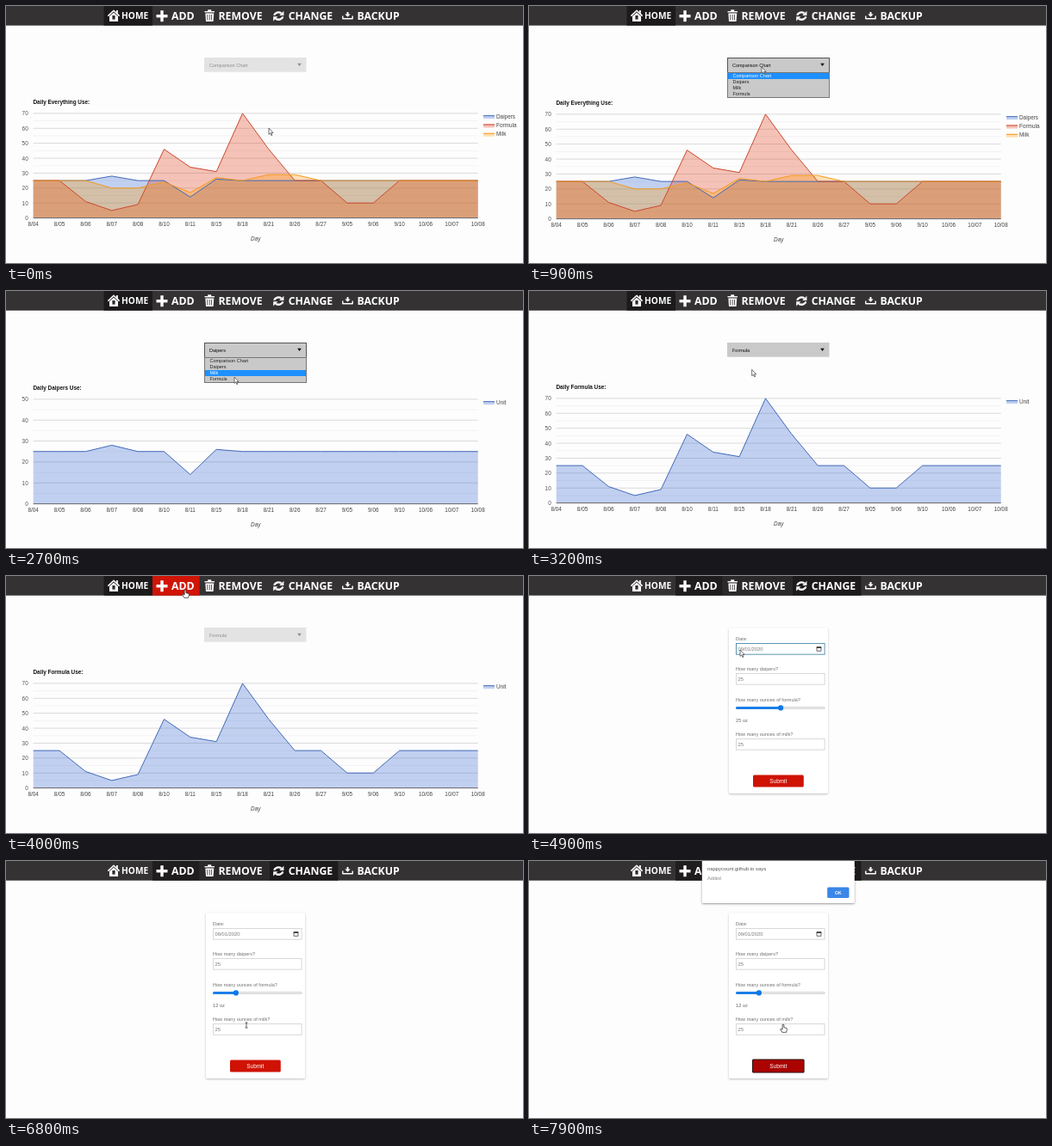
Recreate the animation shown at these times as an HTML page with a canvas. Size 600 by 299 pixels, loop 8000 ms.

```html
<!DOCTYPE html>
<html lang="en">
<head>
<meta charset="utf-8">
<title>Baby supply tracker</title>
<style>
html, body { margin: 0; width: 100%; height: 100%; overflow: hidden; background: #fefdfe; }
canvas { display: block; width: 100vw; height: 100vh; }
</style>
</head>
<body>
<canvas id="stage" width="600" height="299"></canvas>
<script>
const ctx = document.getElementById('stage').getContext('2d');
const LOOP = 8000, STEP = 100;
const FONT = '"Liberation Sans", Arial, sans-serif';
const NAV_FONT = '"Open Sans", "Noto Sans", sans-serif';

// Moments of the recorded session, in ms
const OPEN = [[800, 1500], [2300, 3100]];
const PAGE = 4200, CLICK = 7300, ALERT = 7400;

const DAYS = '8/04 8/05 8/06 8/07 8/08 8/10 8/11 8/15 8/18 8/21 8/26 8/27 9/05 9/06 9/10 10/06 10/07 10/08'.split(' ');
const fill25 = (...v) => DAYS.map((_, i) => v[i] ?? 25);
const SERIES = {
  Daipers: fill25(25, 25, 25, 28, 25, 25, 14, 26),
  Formula: fill25(25, 25, 11, 5, 9, 46, 34, 31, 70, 46, 25, 25, 10, 10),
  Milk: fill25(25, 25, 25, 20, 20, 24, 17, 27, 25, 29, 29)
};
const COLORS = ['#3366cc', '#dc3912', '#ff9900'];
const LINES = ['#4169b8', '#c9492c', '#f59a1c'];
const OPTIONS = ['Comparison Chart', 'Daipers', 'Milk', 'Formula'];

const BAR = 22.7;
const TABS = [
  { name: 'HOME', x: 113.5, w: 56.5, tx: 134, size: 10.2 },
  { name: 'ADD', x: 170, w: 54.6, tx: 192, size: 12.3 },
  { name: 'REMOVE', x: 224.6, w: 81.4, tx: 246.5, size: 12.3 },
  { name: 'CHANGE', x: 306, w: 79.5, tx: 327.7, size: 12.3 },
  { name: 'BACKUP', x: 385.5, w: 77.5, tx: 407.5, size: 12.3 }
];

// Pointer path: time, x, y
const PATH = [
  [0, 305, 142], [300, 289, 100], [500, 275, 74], [700, 271, 69], [900, 270, 71],
  [1200, 269, 82], [1500, 269, 90], [2100, 269, 90], [2300, 268, 71], [2500, 267, 82],
  [2600, 266, 95], [2700, 265, 100], [3100, 265, 101], [3400, 246, 72], [3800, 208, 16],
  [4300, 208, 16], [4600, 228, 50], [4900, 245, 86], [5000, 246, 90], [5400, 268, 124],
  [5800, 291, 152], [6000, 291, 153], [6400, 267, 153], [6600, 270, 167], [6800, 279, 191],
  [7000, 289, 235], [7100, 290, 238], [7300, 290, 238], [7900, 295, 190]
];

const clamp = v => Math.max(0, Math.min(1, v));
const ramp = (t, a, b) => clamp((t - a) / (b - a));
const mix = (a, b, k) => a + (b - a) * k;
const gray = v => `rgb(${v},${v},${v})`;
const inside = (p, x, y, w, h) => p.x >= x && p.x < x + w && p.y >= y && p.y < y + h;

function pointer(t) {
  const i = PATH.findIndex(k => k[0] > t);
  if (i < 1) { const [, x, y] = PATH[PATH.length - 1]; return { x, y }; }
  const a = PATH[i - 1], b = PATH[i], k = ramp(t, a[0], b[0]);
  return { x: mix(a[1], b[1], k), y: mix(a[2], b[2], k) };
}

function rect(x, y, w, h, color) {
  ctx.fillStyle = color;
  ctx.fillRect(x, y, w, h);
}

function frame(x, y, w, h, color) {
  ctx.strokeStyle = color;
  ctx.lineWidth = 1;
  ctx.strokeRect(x + .5, y + .5, w - 1, h - 1);
}

function round(x, y, w, h, r, color) {
  ctx.fillStyle = color;
  ctx.beginPath();
  ctx.roundRect(x, y, w, h, r);
  ctx.fill();
}

function shadowed(blur, color, draw) {
  ctx.save();
  ctx.shadowBlur = blur;
  ctx.shadowColor = color;
  ctx.shadowOffsetY = 1;
  draw();
  ctx.restore();
}

function text(s, x, cy, size, color, style = '', align = 'left', font = FONT) {
  ctx.font = `${style} ${size}px ${font}`;
  ctx.fillStyle = color;
  ctx.textAlign = align;
  ctx.fillText(s, x, cy + size * .36);
}

function shape(d, x, y, fill, stroke, width = 1) {
  const p = new Path2D(d);
  ctx.save();
  ctx.translate(x, y);
  if (fill) { ctx.fillStyle = fill; ctx.fill(p); }
  if (stroke) {
    ctx.strokeStyle = stroke;
    ctx.lineWidth = width;
    ctx.lineJoin = 'round';
    ctx.stroke(p);
  }
  ctx.restore();
}

// Navigation bar
const ICONS = [
  () => {
    shape('M.4 7.6L7 1.2L13.6 7.6', 118, 4, null, '#fff', 1.5);
    shape('M2 8L7 3.4L12 8V14H2Z', 118, 4, '#fff');
    rect(123.4, 11, 3.2, 4.6, '#2a2829');
    rect(128, 5, 1.8, 4, '#fff');
  },
  () => { rect(174.5, 10, 13, 3.4, '#fff'); rect(179.3, 5.2, 3.4, 13, '#fff'); },
  () => {
    rect(230.5, 6, 11.5, 1.4, '#fff');
    rect(234.2, 4.3, 4, 1.8, '#fff');
    shape('M1.4 4.4H11.2L10.6 14H2Z', 230, 4, '#fff');
    for (const x of [233.4, 235.8, 238.2]) rect(x, 10, .8, 6.5, '#333');
  },
  () => {
    shape('M1.2 5.2A5.2 4.4 0 0 1 9.6 2.9M11.4 6.8A5.2 4.4 0 0 1 3 9.1', 310, 5.6, null, '#fff', 2.3);
    shape('M12.4 .2V5.4H7.2ZM.2 11.8V6.6H5.4Z', 310, 5.6, '#fff');
  },
  () => {
    shape('M.8 5.4V8.8H12.2V5.4', 390, 6, null, '#fff', 1.4);
    shape('M5.5 1H7.5V3.4H9.7L6.5 6.8L3.3 3.4H5.5Z', 390, 6, '#fff');
  }
];

function nav(t, p) {
  const tones = t < PAGE ? ['#1c1a1b'] : [, '#1f1d1e', '#2b292a', '#1c1a1b'];
  rect(0, 0, 600, BAR, '#343233');
  TABS.forEach((tab, i) => {
    const over = t < ALERT && inside(p, tab.x, 0, tab.w, BAR);
    const tone = over ? '#d01507' : tones[i];
    if (tone) rect(tab.x, 0, tab.w, BAR, tone);
    ICONS[i]();
    text(tab.name, tab.tx, 11.6, tab.size, '#fff', 'bold', 'left', NAV_FONT);
  });
}

// Chart page
function chart(view, dy) {
  const all = view === OPTIONS[0];
  const names = all ? Object.keys(SERIES) : [view];
  const max = view === 'Daipers' ? 50 : 70;
  const px = i => 31.7 + i * 516 / 17;
  const py = v => 246.6 - v * 121.7 / max;

  ctx.save();
  ctx.translate(0, dy);
  text(`Daily ${all ? 'Everything' : view} Use:`, 31.5, 111.3, 6.4, '#111', 'bold');
  for (let v = 0; v <= max; v += 5) {
    const y = py(v);
    rect(31.7, y - .5, 516, 1, v % 10 ? '#f3f2f3' : '#dad9da');
    if (v % 10 === 0) text(v, 25.7, y + .2, 6.4, '#555', '', 'right');
  }

  const trace = n => SERIES[n].forEach((v, i) => ctx.lineTo(px(i), py(v)));
  names.forEach((n, i) => {
    ctx.beginPath();
    trace(n);
    ctx.lineTo(px(17), py(0));
    ctx.lineTo(px(0), py(0));
    ctx.globalAlpha = .3;
    ctx.fillStyle = COLORS[i];
    ctx.fill();
    ctx.globalAlpha = 1;
  });
  rect(31.7, py(0) - .5, 516, 1, '#6a6a6e');
  ctx.lineWidth = 1;
  names.forEach((n, i) => {
    ctx.beginPath();
    trace(n);
    ctx.strokeStyle = LINES[i];
    ctx.stroke();

    const y = 128.2 + i * 10.3;
    ctx.globalAlpha = .3;
    rect(554, y - 1, 13, 4, COLORS[i]);
    ctx.globalAlpha = 1;
    rect(554, y - 1, 13, 1, LINES[i]);
    text(all ? n : 'Unit', 569, y, 6.4, '#444');
  });

  DAYS.forEach((d, i) => text(d, px(i), 254, 6.4, '#444', '', 'center'));
  text('Day', 289.7, 270.5, 6.4, '#444', 'italic', 'center');
  ctx.restore();
}

function picker(t, view, open) {
  const dark = ramp(t, 200, 600) * (1 - ramp(t, 3400, 4000));
  const ink = gray(mix(140, 10, dark));
  rect(230, 60, 118.5, open ? 18 : 16.7, gray(mix(227, 201, dark)));
  text(view, 236, 68.7, 5.5, ink);
  shape('M0 0H4.6L2.3 3.2Z', 338.2, 66.8, ink);
  if (!open) return;
  frame(230, 60, 119, 18, '#555');
  rect(230, 77, 119, 30, '#c9c9c9');
  frame(230, 77, 119, 30, '#777');
  const y = pointer(t - STEP).y;
  const hot = y < 78 ? OPTIONS.indexOf(view) : Math.min(3, Math.floor((y - 78) / 7));
  OPTIONS.forEach((name, i) => {
    if (i === hot) rect(231, 78 + i * 7, 117, 7, '#1e90ff');
    text(name, 236.5, 81.4 + i * 7, 5.5, i === hot ? '#fff' : '#222');
  });
}

// Entry form
function field(label, value, y, hot) {
  text(label, 240, y - 4.8, 5.55, '#707070');
  rect(240, y, 103.5, 14, '#fff');
  frame(240, y, 103.6, 13.7, hot ? '#5a94b4' : '#d8d8d8');
  text(value, 242.5, y + 7, 5.8, '#777');
}

function slider(value) {
  const x = 243.6 + value / 50 * 97;
  round(240, 152, 103.5, 3, 1.5, '#c4c4c4');
  round(240.6, 152.6, 102.3, 1.8, .9, '#ececec');
  round(240, 152, x - 240, 3, 1.5, '#1a7fe8');
  ctx.fillStyle = '#0f78e8';
  ctx.beginPath();
  ctx.arc(x, 153.4, 3.1, 0, 7);
  ctx.fill();
}

function form(t, p) {
  const ounces = Math.round(mix(25, 12, ramp(t, 6000, 6400)));
  shadowed(2.5, 'rgba(0,0,0,.25)', () => round(232, 60.3, 115, 192.7, 1.5, '#fff'));
  field('Date:', '09/01/2020', 78, t >= 4800 && t < 5000);
  shape('M0 0H5V4.6H0Z', 334, 82.7, null, '#444', .8);
  rect(333.8, 82.4, 5.4, 1.5, '#333');
  field('How many daipers?', '25', 113, inside(p, 240, 113, 104, 14));
  text('How many ounces of formula?', 240, 143.6, 5.55, '#707070');
  slider(ounces);
  text(ounces + ' oz', 240, 167.6, 5.7, '#666');
  field('How many ounces of milk?', '25', 189, false);

  const pressed = t >= CLICK;
  const over = inside(p, 260, 231, 59, 15);
  if (pressed) round(259, 230.5, 60.6, 15.9, 1.5, '#2a0a0a');
  round(260, 231.4, 58.8, 14.2, 1.5, pressed || over ? '#ab0300' : '#cf1204');
  text('Submit', 289.3, 238.5, 6.4, '#fff', '', 'center');
}

function dialog() {
  shadowed(2.5, 'rgba(0,0,0,.4)', () => round(200.8, -4, 177, 53, 1.5, '#fff'));
  text('nappycount.github.io says', 207, 9, 5.9, '#555');
  text('Added', 207, 20.3, 5.5, '#888');
  round(346.2, 30.6, 25.3, 12.3, 1.5, '#3b86e8');
  text('OK', 358.8, 36.8, 5, '#fff', 'bold', 'center');
}

// Mouse pointer
function cursor(t, p) {
  const { x, y } = p;
  const typing = t > 5000 && (inside(p, 240, 113, 104, 14) || inside(p, 240, 189, 104, 14));
  if (y < BAR || t >= 6950) {
    shape('M-.9 .5Q0 -.5 .9 .5V3.6L4 4.5Q4.6 5 4.4 6.4L3.6 9.3H-1.2L-3.4 5.8Q-3 4.6 -.9 6Z', x, y, '#fff', '#333', .8);
  } else if (typing) {
    shape('M-1.5 -3H1.5M0 -3V3M-1.5 3H1.5', x, y, null, '#333', .8);
  } else {
    shape('M0 0V7.4L1.7 5.9L2.9 8.6L4 8.1L2.8 5.5H5Z', x, y, '#fff', '#444', .75);
  }
}

function draw(t) {
  const p = pointer(t);
  rect(0, 0, 600, 299, '#fefdfe');
  nav(t, p);
  if (t < PAGE) {
    const view = t < OPEN[0][1] ? OPTIONS[0] : t < OPEN[1][1] ? 'Daipers' : 'Formula';
    const open = OPEN.some(([a, b]) => t >= a && t < b);
    chart(view, open ? 1 : 0);
    picker(t, view, open);
  } else {
    form(t, p);
    if (t >= ALERT) dialog();
  }
  cursor(t, p);
}

const start = performance.now();
function tick() {
  const t = (performance.now() - start) % LOOP;
  draw(Math.floor(t / STEP) * STEP);
  requestAnimationFrame(tick);
}
tick();
</script>
</body>
</html>
```
